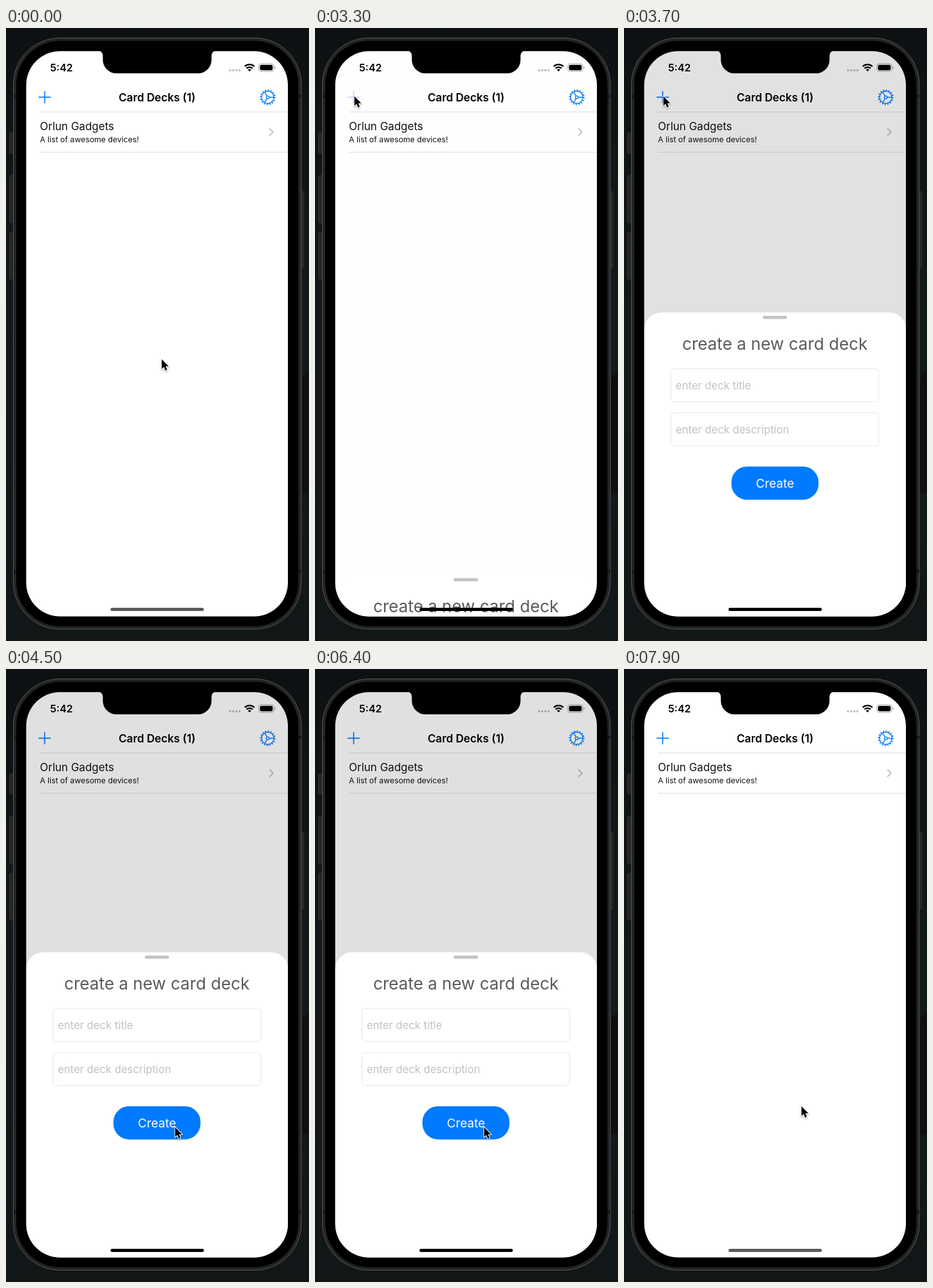
These frames come from a looping animation (474x960 px, 8 s). An HTML page:

```html
<!DOCTYPE html>
<html lang="en">
<head>
<meta charset="utf-8">
<title>Card decks</title>
<style>
  html, body { margin: 0; width: 100%; height: 100%; overflow: hidden; background: #101415; }
  svg { display: block; width: 100vw; height: 100vh; }
  text { font-family: Inter, "Liberation Sans", sans-serif; font-optical-sizing: none; }
  .mid { text-anchor: middle; }
  .hint { font-size: 16.7px; fill: #c2c2c4; }
  .blue { fill: none; stroke: #007aff; }
  .field { fill: #fff; stroke: #e7e7e8; }
</style>
</head>
<body>
<svg viewBox="0 0 474 960">
  <defs>
    <clipPath id="screenClip"><rect x="31.6" y="36.2" width="409.4" height="885.4" rx="53"/></clipPath>
    <linearGradient id="backdrop" x2="0" y2="1">
      <stop offset="0" stop-color="#0d1112"/>
      <stop offset=".5" stop-color="#14191b"/>
      <stop offset="1" stop-color="#111617"/>
    </linearGradient>
    <filter id="soft" x="-50%" y="-50%" width="200%" height="200%">
      <feDropShadow dx="0" dy="1.5" stdDeviation="1.3" flood-opacity=".35"/>
    </filter>
  </defs>

  <rect width="474" height="960" fill="url(#backdrop)"/>
  <path d="M474 538q-7 4-11 10v180h11Z" fill="#0f0f0e"/>

  <!-- Phone body -->
  <g fill="#242627" stroke="#343637" stroke-width=".8">
    <rect x="5.5" y="164" width="8" height="32" rx="1.5"/>
    <rect x="5.5" y="231" width="8" height="74" rx="1.5"/>
    <rect x="5.5" y="320" width="8" height="73" rx="1.5"/>
    <rect x="459" y="256" width="7" height="120" rx="1.5"/>
  </g>
  <rect x="11.5" y="15.5" width="450.5" height="926" rx="73" fill="#232424" stroke="#575859"/>
  <path d="M12 107h5M457 107h5M12 851h5M457 851h5" stroke="#171818" stroke-width="5"/>
  <rect x="16" y="20" width="441.5" height="917" rx="69" fill="#000"/>

  <g clip-path="url(#screenClip)">
    <rect x="31" y="36" width="411" height="886" fill="#fff"/>

    <!-- Status bar -->
    <text x="69" y="68" font-size="16" font-weight="600">5:42</text>
    <path d="M350.5 66.2h16" stroke="#b9b9bb" stroke-width="3.4" stroke-linecap="round" stroke-dasharray="0 4.9"/>
    <g fill="none" stroke="#000" stroke-width="2.3">
      <path d="M373.4 60.2a11 11 0 0 1 15.2 0"/>
      <path d="M376.2 63.2a7 7 0 0 1 9.6 0"/>
    </g>
    <path d="M378.4 65.3a4 4 0 0 1 5.2 0L381 68Z"/>
    <rect x="395.5" y="56" width="23.5" height="12" rx="3.6" fill="none" stroke="#a4a4a6"/>
    <rect x="397.3" y="57.8" width="19.9" height="8.4" rx="2.1"/>
    <path d="M420.3 60v4q1.6-.5 1.6-2t-1.6-2" fill="#a4a4a6"/>

    <!-- Navigation bar -->
    <path id="plus" class="blue" d="M51.7 108.4h17.6M60.5 99.6v17.6" stroke-width="1.7" stroke-linecap="round"/>
    <text x="236.3" y="114.8" class="mid" font-size="17.2" font-weight="600">Card Decks (1)</text>
    <g class="blue" transform="translate(409.5 108.5)">
      <circle r="9.7" stroke-width="1.4"/>
      <circle r="11.3" stroke-width="2" pathLength="48" stroke-dasharray="1.2 1.8"/>
      <circle r="2.2" stroke-width="1.3"/>
      <path id="spokes" stroke-width="1.4"/>
    </g>

    <!-- Deck row -->
    <path d="M53 131.5h388M53 194.5h388" stroke="#dededf"/>
    <text x="53" y="160.3" font-size="17" fill="#111">Orlun Gadgets</text>
    <text x="53" y="179.4" font-size="12.3" fill="#111">A list of awesome devices!</text>
    <path d="M412.5 157.8l5.3 5.3-5.3 5.3" fill="none" stroke="#c3c3c6" stroke-width="2" stroke-linecap="round" stroke-linejoin="round"/>

    <rect id="dim" x="31" y="36" width="411" height="886" opacity="0"/>

    <!-- Sheet, laid out at its open position -->
    <g id="sheet">
      <rect x="31.5" y="443.5" width="410" height="560" rx="27" fill="#fff"/>
      <rect x="217" y="448.8" width="38" height="5" rx="2.5" fill="#c3c3c5"/>
      <text x="236" y="502.4" class="mid" font-size="26.2" fill="#5a5a5b">create a new card deck</text>
      <rect class="field" x="73.5" y="531.5" width="325" height="52" rx="5"/>
      <rect class="field" x="73.5" y="600.5" width="325" height="52" rx="5"/>
      <text x="81" y="564" class="hint">enter deck title</text>
      <text x="81" y="633" class="hint">enter deck description</text>
      <g id="button">
        <rect x="168" y="684.7" width="136.3" height="52" rx="24.5" fill="#007aff"/>
        <text x="236.2" y="717.8" class="mid" font-size="19" fill="#fff">Create</text>
      </g>
    </g>

    <rect id="homeBar" x="163.5" y="908" width="146" height="5" rx="2.5"/>
  </g>

  <!-- Notch -->
  <path d="M144 35.5a7.5 7.5 0 0 1 7.5 7.5v7a21 21 0 0 0 21 21h128a21 21 0 0 0 21-21v-7a7.5 7.5 0 0 1 7.5-7.5Z"/>

  <g id="cursor" filter="url(#soft)">
    <path d="M.6 .8V16L4 12.8 6.4 18.4 9 17.3 6.7 11.8H11.4Z" stroke="#fff" stroke-width="2" stroke-linejoin="round" paint-order="stroke"/>
  </g>
</svg>
<script>
const LOOP = 8000;
const OPEN_AT = 3264, CLOSE_AT = 6850;
const TRAVEL = 478, DIM = 0.12;
const $ = id => document.getElementById(id);
const clamp = v => Math.min(1, Math.max(0, v));
const ramp = (t, from, to) => clamp((t - from) / (to - from));
const ease = p => p * p * (3 - 2 * p);
const mix = (a, b, p) => a + (b - a) * p;

// Time, x, y of the pointer tip
const pointer = [
  [0, 243, 518], [350, 243, 518], [700, 174, 530], [1150, 163, 300],
  [1500, 170, 190], [1900, 202, 163], [2100, 202, 163], [2900, 61, 106],
  [3800, 61, 106], [4400, 264, 717], [7250, 264, 717], [7600, 277, 684],
  [LOOP, 277, 684]
];

function pointerAt(t) {
  const i = pointer.findIndex(stop => stop[0] > t);
  const [t0, x0, y0] = pointer[i - 1], [t1, x1, y1] = pointer[i];
  const p = ease(ramp(t, t0, t1));
  return [mix(x0, x1, p), mix(y0, y1, p)];
}

// Critically damped spring from 0 to 1
function spring(ms) {
  const x = Math.max(0, ms) * 0.0174;
  return 1 - (1 + x) * Math.exp(-x);
}

// Rises to 1 while pressed and fades out after release
const press = (t, down, up) => ramp(t, down, down + 60) * (1 - ease(ramp(t, up, up + 450)));

function draw(t) {
  const open = spring(t - OPEN_AT) * (1 - spring(t - CLOSE_AT));
  $("sheet").setAttribute("transform", `translate(0 ${(TRAVEL * (1 - open)).toFixed(2)})`);
  $("sheet").setAttribute("visibility", open > 0.001 ? "visible" : "hidden");
  $("dim").setAttribute("opacity", open * open * DIM);
  $("plus").setAttribute("opacity", 1 - 0.75 * press(t, 3100, 3300));
  $("button").setAttribute("opacity", 1 - 0.6 * press(t, 6700, 6820));
  const grey = Math.round(92 * (1 - ramp(t, OPEN_AT - 60, OPEN_AT + 30) + ramp(t, CLOSE_AT + 150, CLOSE_AT + 450)));
  $("homeBar").setAttribute("fill", `rgb(${grey},${grey},${grey})`);
  const [x, y] = pointerAt(t);
  $("cursor").setAttribute("transform", `translate(${x.toFixed(2)} ${y.toFixed(2)})`);
}

$("spokes").setAttribute("d", [0, 120, 240].map(deg => {
  const a = deg * Math.PI / 180, c = Math.cos(a), s = Math.sin(a);
  return `M${2.2 * c} ${2.2 * s}L${9.7 * c} ${9.7 * s}`;
}).join(""));

const start = performance.now();
function tick() {
  draw((performance.now() - start) % LOOP);
  requestAnimationFrame(tick);
}
tick();
</script>
</body>
</html>
```
